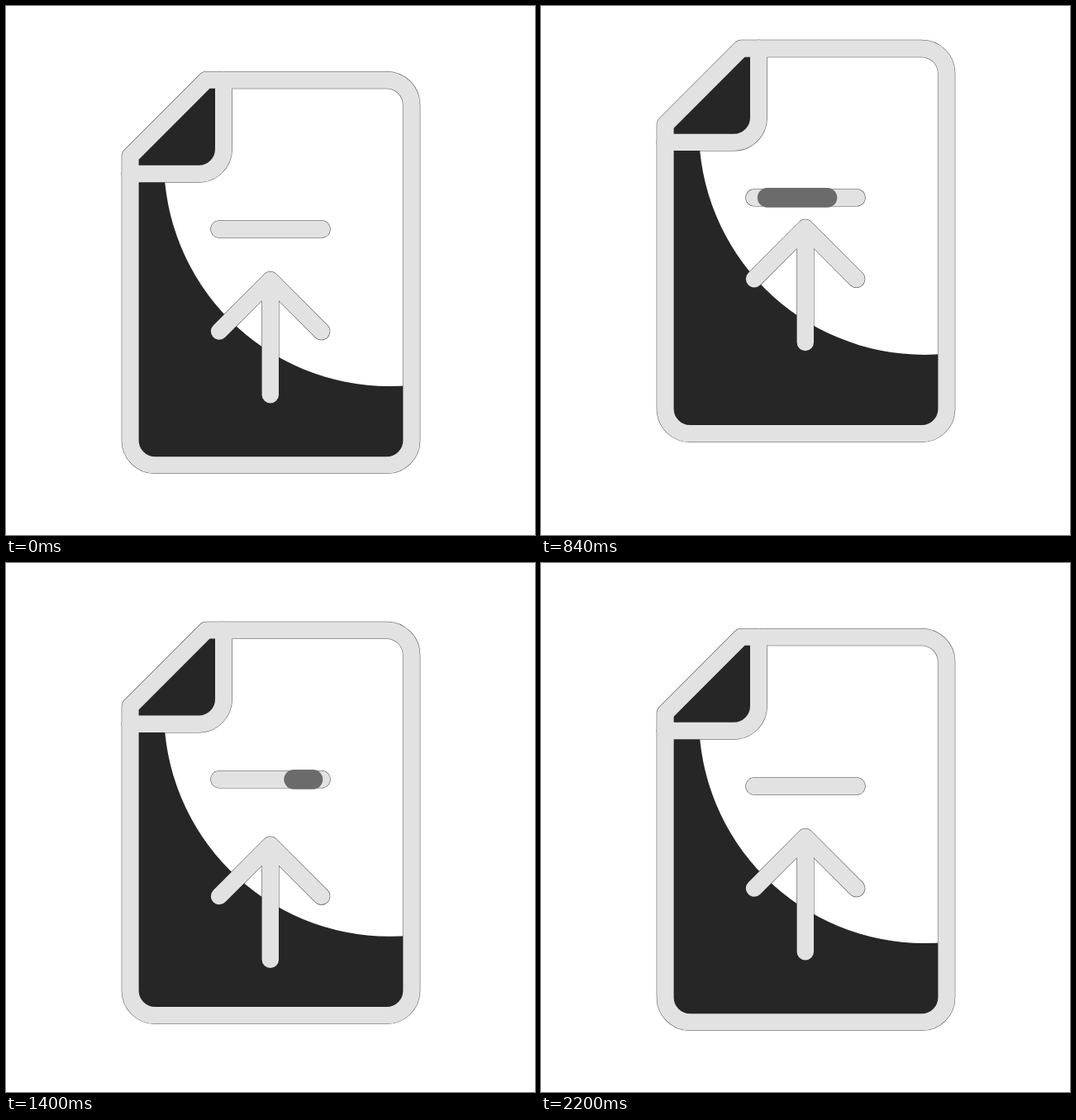
An HTML page for the animation above (2.4 s loop, 640 by 640 pixels).

```html
<!DOCTYPE html>
<html lang="en">
<head>
<meta charset="utf-8">
<title>Upload file</title>
<style>
  html, body { margin: 0; width: 100%; height: 100%; overflow: hidden; background: #fff; }
  svg { display: block; width: 100%; height: 100%; }
  .line { fill: none; stroke: #e2e2e2; stroke-width: 20.4; stroke-linecap: round; stroke-linejoin: round; }
  .edge { stroke: #262626; stroke-width: 21.4; stroke-opacity: .8; }
  .dark { fill: #262626; }
  #fill { fill: none; stroke: #6b6b6b; stroke-width: 23.8; stroke-linecap: round; }
</style>
</head>
<body>
<svg viewBox="0 0 640 640">
  <defs>
    <path id="sheet" d="M242.3 89.6H460.6A30 30 0 0 1 490.6 119.6V525.4A30 30 0 0 1 460.6 555.4H180.4A30 30 0 0 1 150.4 525.4V181.6Z"/>
    <path id="fold" d="M263.2 89.6V173A30 30 0 0 1 233.2 203H150.4"/>
    <path id="bar" d="M258 270H382"/>
    <path id="up" d="M258 393.6L319.8 331.8L381.6 393.6M319.8 331.8V470.4"/>
    <g id="outline"><use href="#sheet"/><use href="#fold"/><use href="#bar"/></g>
    <clipPath id="inside"><use href="#sheet"/></clipPath>
  </defs>
  <g id="page">
    <use href="#sheet" class="dark"/>
    <circle cx="464" cy="187" r="273" fill="#fff" clip-path="url(#inside)"/>
    <path class="dark" d="M242.3 89.6H263.2V173A30 30 0 0 1 233.2 203H150.4V181.6Z"/>
    <use href="#outline" class="line edge"/>
    <use href="#outline" class="line"/>
    <path id="fill"/>
  </g>
  <g id="arrow">
    <use href="#up" class="line edge"/>
    <use href="#up" class="line"/>
  </g>
</svg>
<script>
  const LOOP = 2400, STEP = 40;
  const byId = id => document.getElementById(id);
  const page = byId('page'), arrow = byId('arrow'), fill = byId('fill');

  // Cubic Bezier easing with handles (x1, 0) and (x2, 1).
  const bezier = (x1, x2) => x => {
    if (x <= 0) return 0;
    if (x >= 1) return 1;
    let lo = 0, hi = 1, s;
    for (let i = 0; i < 24; i++) {
      s = (lo + hi) / 2;
      const r = 1 - s;
      if (3 * x1 * s * r * r + 3 * x2 * s * s * r + s ** 3 < x) lo = s; else hi = s;
    }
    return s * s * (3 - 2 * s);
  };
  const glide = bezier(.574, .22), smooth = bezier(1 / 3, 2 / 3);

  // Each move is [start ms, end ms, distance]; distances add up.
  const track = (moves, ease) => t =>
    moves.reduce((sum, [a, b, d]) => sum + d * ease((t - a) / (b - a)), 0);

  const pageY = track([[276, 968, -39], [968, 1750, 39]], glide);
  const arrowY = track([[333, 943, -64.5], [943, 1678, 85], [1678, 2200, -20.5]], glide);
  const fillFrom = track([[408, 880, .13], [1064, 1600, .87]], smooth);
  const fillTo = track([[408, 880, .727], [1064, 1600, .273]], smooth);

  const shift = (el, y) => el.setAttribute('transform', `translate(0 ${y.toFixed(2)})`);

  function draw(now) {
    const t = Math.floor(now % LOOP / STEP) * STEP;
    shift(page, pageY(t));
    shift(arrow, arrowY(t));
    const from = fillFrom(t), to = fillTo(t);
    fill.setAttribute('d', to - from > .001 ? `M${258 + 124 * from} 270H${258 + 124 * to}` : '');
    requestAnimationFrame(draw);
  }
  draw(0);
</script>
</body>
</html>
```
